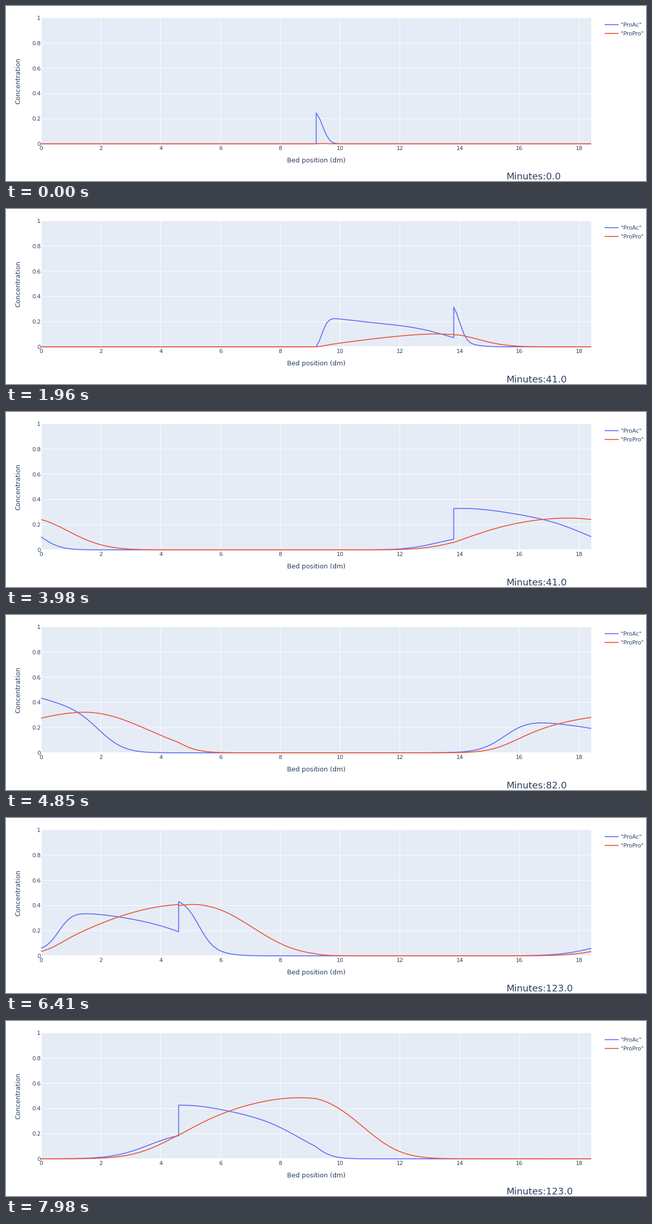
These frames come from a looping animation (1239 px wide and 339 px high, 8000 ms). A matplotlib script:

```python
import numpy as np
import matplotlib.pyplot as plt
from matplotlib.animation import FuncAnimation
from matplotlib.patches import Rectangle

W, H, DPI = 1239, 339, 64
PT = 72 / DPI                      # points per pixel
LEFT, RIGHT, TOP, BOTTOM = 68, 1133, 23, 267
BED, COLS, CELLS = 18.4, 4, 40
INK, PAPER = "#2a3f5f", "#e5ecf6"
BLUE, RED = "#636efa", "#ef553b"

LOOP, INTERVAL = 8000, 40          # ms
STEP, STEPS = 78.1, 103            # ms per model step, number of steps
SUB = 10                           # solver substeps per model step
SWITCHES = np.array([241, 513, 785])   # port switches, in substeps

# Front speeds (dm per step) for the zones after feed, raffinate,
# eluent and extract; one row per component.
SPEED = np.array([[0.172, 0.090, 0.200, 0.157],
                  [0.260, 0.143, 0.300, 0.222]])
SPREAD = 0.048
FEED, DILUTION = 0.245, 0.978
DECAY, GAIN, CAP = 0.022, 0.041, 1.0


def advance(c, period, dt, dx):
    """One explicit upwind substep of the four-column ring."""
    feed = (2 + period) % COLS
    v = SPEED[:, (np.arange(COLS) - feed) % COLS][:, :, None]
    inlet = np.roll(c[:, :, -1], 1, axis=1)
    inlet[:, feed] *= DILUTION
    inlet[0, feed] += FEED
    c[:, :, 0] = inlet
    slope = np.diff(c, axis=2)
    bend = np.zeros_like(slope)
    bend[:, :, :-1] = np.diff(slope, axis=2)
    rate = -v * slope / dx + SPREAD * v * bend / dx ** 2
    ester, product = c[0, :, 1:], c[1, :, 1:]
    rate[0] -= DECAY * ester
    rate[1] += GAIN * ester * (1 - product / CAP)
    c[:, :, 1:] += dt * rate


def simulate():
    c = np.zeros((2, COLS, CELLS + 1))
    dx = BED / COLS / CELLS
    states = []
    for i in range(-SUB, (STEPS - 1) * SUB):
        advance(c, int(np.sum(SWITCHES <= i)), 1 / SUB, dx)
        if (i + 1) % SUB == 0 and i + 1 >= 0:
            states.append(c.reshape(2, -1).copy())
    return states


def px(x):
    return LEFT + (RIGHT - LEFT) * np.asarray(x) / BED


def py(y):
    return BOTTOM - (BOTTOM - TOP) * np.asarray(y)


fig = plt.figure(figsize=(W / DPI, H / DPI), dpi=DPI, facecolor="white")
ax = fig.add_axes([0, 0, 1, 1])
ax.set_xlim(0, W)
ax.set_ylim(H, 0)
ax.axis("off")


def line(xs, ys, color, width, z):
    return ax.plot(xs, ys, color=color, lw=width * PT, zorder=z, clip_on=False,
                   snap=False, solid_capstyle="butt",
                   solid_joinstyle="round")[0]


def label(x, y, text, size, ha="left", **kw):
    return ax.text(x, y, text, fontsize=size * PT, color=INK, ha=ha,
                   va="baseline", family="DejaVu Sans", **kw)


ax.add_patch(Rectangle((LEFT, TOP), RIGHT - LEFT, BOTTOM - TOP,
                       facecolor=PAPER, lw=0, zorder=0))
for x in range(0, 19, 2):
    line([px(x)] * 2, [TOP, BOTTOM], "white", 1.8 if x == 0 else 1, 1)
    label(px(x), 279.4, str(x), 10.8, "center")
for i in range(6):
    y = py(i / 5)
    line([LEFT, RIGHT], [y, y], "white", 1.8 if i == 0 else 1, 1)
    label(67, y + 4, f"{i / 5:g}", 10.8, "right")

label(600.5, 303, "Bed position (dm)", 12.6, "center")
label(27, 145, "Concentration", 12.6, "center", rotation=90,
      rotation_mode="anchor")
for y, color, name in ((36.2, BLUE, '"ProAc"'), (53.2, RED, '"ProPro"')):
    line([1159, 1186], [y, y], color, 1.8, 2)
    label(1190, y + 3.8, name, 10.9)
clock = label(968, 336, "Minutes:0.0", 18.1)

nodes = np.concatenate([np.linspace(j, j + 1, CELLS + 1) for j in range(COLS)])
xs = px(nodes * BED / COLS)
curves = [line(xs, py(0 * nodes), color, 1.8, z)
          for color, z in ((BLUE, 3), (RED, 4))]
states = simulate()


def update(frame):
    step = min(int((frame * INTERVAL + 10) / STEP), STEPS - 1)
    for curve, values in zip(curves, states[step]):
        curve.set_ydata(py(values))
    period = int(np.sum(SWITCHES <= step * SUB))
    clock.set_text(f"Minutes:{41 * period:.1f}")
    return [*curves, clock]


anim = FuncAnimation(fig, update, frames=LOOP // INTERVAL, interval=INTERVAL,
                     init_func=lambda: update(0), repeat=True, repeat_delay=0,
                     blit=False)
plt.show()
```
